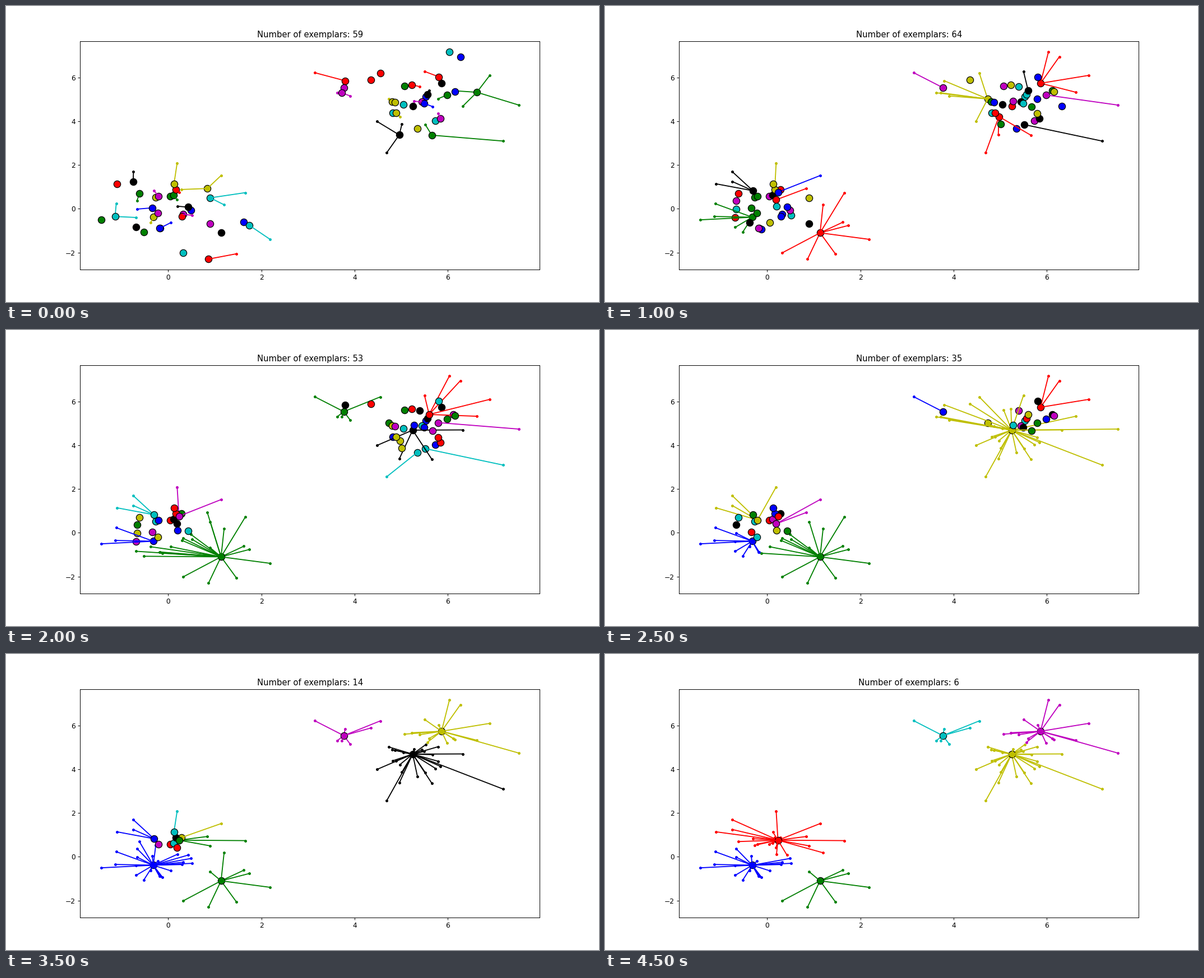
These frames come from a looping animation (1058 by 529 pixels, 5 s). A matplotlib script:

```python
"""Affinity propagation on two normal clouds, drawn after every fifth step."""
from itertools import cycle

import matplotlib.pyplot as plt
import numpy as np
from matplotlib.animation import FuncAnimation

N = 50
DAMPING = 0.5
FRAMES = 10
STRIDE = 5  # message-passing steps between pictures

np.random.seed(1)
points = np.vstack([np.random.normal(0, 1, (N, 2)),
                    np.random.normal(5, 1, (N, 2))])


def blend(old, new):
    return old * DAMPING + new * (1 - DAMPING)


def update_responsibility(S, R, A):
    rows = np.arange(len(S))
    v = S + A
    np.fill_diagonal(v, -np.inf)
    best = v.argmax(axis=1)
    first = v[rows, best]
    v[rows, best] = -np.inf
    rival = np.tile(first[:, None], len(S))
    rival[rows, best] = v.max(axis=1)
    return blend(R, S - rival)


def update_availability(R, A):
    support = np.clip(R, 0, None)
    np.fill_diagonal(support, 0)
    total = support.sum(axis=0)
    new = np.minimum(total + R.diagonal() - support, 0)
    np.fill_diagonal(new, total)
    return blend(A, new)


def propagate():
    """Return the chosen exemplar of every point for each picture."""
    S = -((points[:, None] - points[None]) ** 2).sum(axis=2)
    np.fill_diagonal(S, np.median(S))
    R = np.zeros_like(S)
    A = np.zeros_like(S)
    history = []
    for step in range(FRAMES * STRIDE):
        R = update_responsibility(S, R, A)
        A = update_availability(R, A)
        if step % STRIDE == 0:
            history.append((A + R).argmax(axis=1))
    return history


history = propagate()
fig, ax = plt.subplots(figsize=(12, 6), dpi=88.1667)


def draw(frame):
    ax.clear()
    labels = history[frame]
    exemplars = np.unique(labels)
    colors = dict(zip(exemplars, cycle("bgrcmyk")))
    for i, (px, py) in enumerate(points):
        if i in colors:
            ax.plot(px, py, "o", ms=10, mec="k", c=colors[i])
        else:
            color = colors[labels[i]]
            ex, ey = points[labels[i]]
            ax.plot([px, ex], [py, ey], c=color)
            ax.plot(px, py, "o", ms=3, c=color)
    ax.set_title(f"Number of exemplars: {len(exemplars)}")


anim = FuncAnimation(fig, draw, frames=FRAMES, interval=500,
                     repeat=True, repeat_delay=0)
plt.show()
```
